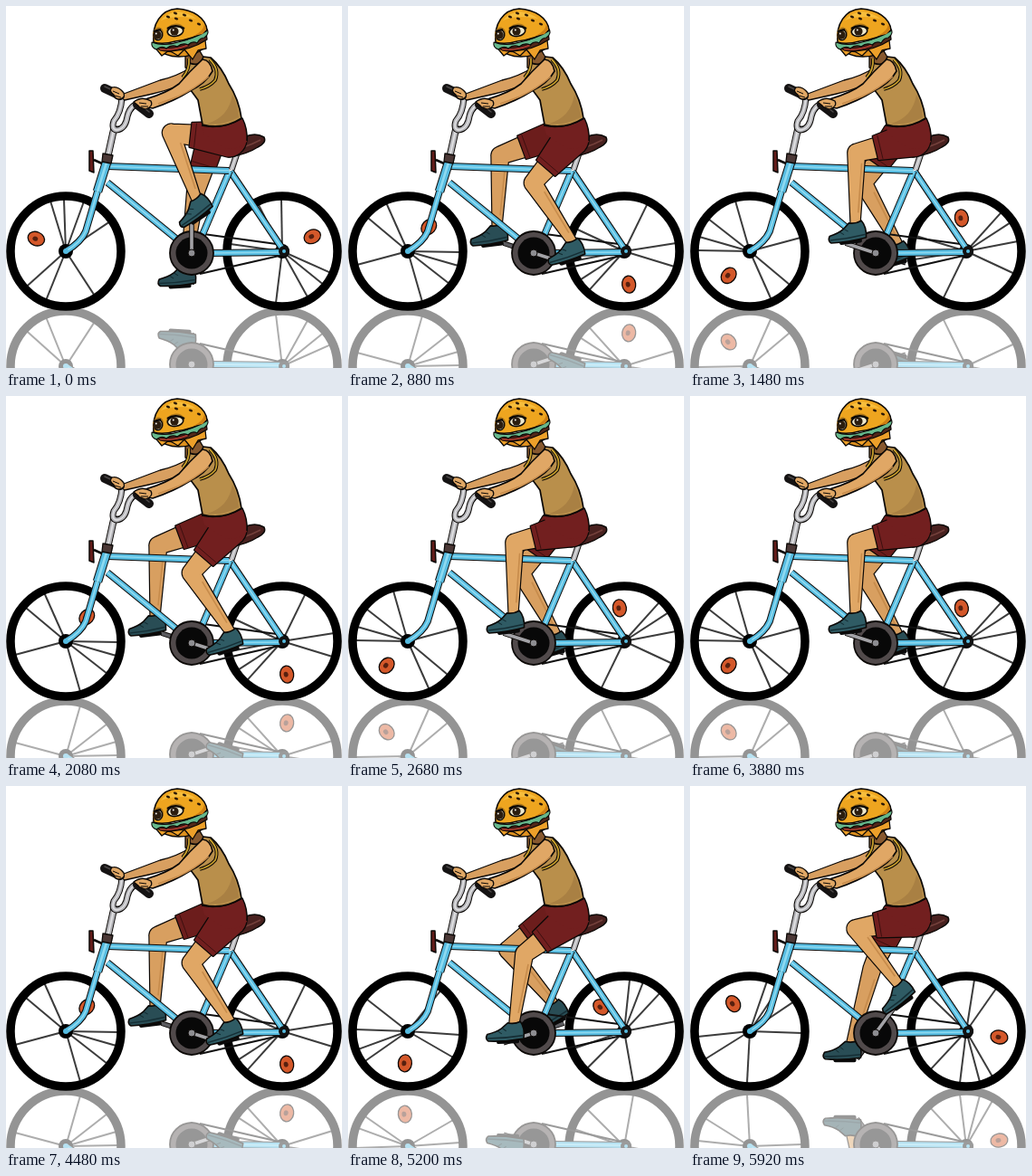
An HTML page with a canvas for the animation above (6000 ms loop, 371 by 400 pixels).

```html
<!DOCTYPE html>
<html lang="en">
<head>
<meta charset="utf-8">
<title>Burger rider</title>
<style>
html, body { margin: 0; width: 100%; height: 100%; overflow: hidden; background: #fff; }
canvas { display: block; width: 371px; height: 400px; }
</style>
</head>
<body>
<canvas id="stage" width="371" height="400"></canvas>
<script>
const W = 371, H = 400, FLOOR = 335, LOOP = 6000, POSES = 10;
const stage = document.getElementById('stage').getContext('2d');
const buffer = document.createElement('canvas');
buffer.width = W;
buffer.height = H;
const g = buffer.getContext('2d');

const INK = '#0b0806', SKIN = '#e0a765', FAR_SKIN = '#d89f60', SHADE = '#c68b4b';
const RED = '#721f1f', DARK_RED = '#6c1d1c', BLUE = '#55bbe0', GLOW = '#8fdaf0', STEEL = '#b4b4b8';
const HUB = 271, FRONT = 66, REAR = 305, AXLE = { x: 205, y: 273 };
const SPOKES = [107, 92, 70, 34, 222, 248, -57];
const TILT = [34, 20, 7, 2, 0, 3, 9, 16, 27, 36];

const rad = d => d * Math.PI / 180;
const polar = (x, y, r, deg) => ({ x: x + r * Math.cos(rad(deg)), y: y - r * Math.sin(rad(deg)) });
const mix = (a, b, k) => ({ x: a.x + (b.x - a.x) * k, y: a.y + (b.y - a.y) * k });

function shape(d, fill, line = 1.3, ink = INK) {
  const p = new Path2D(d);
  if (fill) { g.fillStyle = fill; g.fill(p); }
  if (line) { g.strokeStyle = ink; g.lineWidth = line; g.stroke(p); }
}

function oval(x, y, rx, ry, fill, line = 0, turn = 0) {
  g.beginPath();
  g.ellipse(x, y, rx, ry, rad(turn), 0, 7);
  g.fillStyle = fill;
  g.fill();
  if (line) { g.strokeStyle = INK; g.lineWidth = line; g.stroke(); }
}

function tube(d, width, color, shine) {
  shape(d, null, width + 2, INK);
  shape(d, null, width, color);
  if (shine) shape(d, null, width * 0.3, shine);
}

// Tapered limb with round ends
function taper(path, a, b, ra, rb) {
  const t = Math.atan2(b.y - a.y, b.x - a.x), q = Math.PI / 2, part = new Path2D();
  part.arc(a.x, a.y, ra, t + q, t + 3 * q);
  part.arc(b.x, b.y, rb, t - q, t + q);
  part.closePath();
  path.addPath(part);
}

function outlined(path, fill) {
  g.strokeStyle = INK;
  g.lineWidth = 2.4;
  g.stroke(path);
  g.fillStyle = fill;
  g.fill(path);
}

function wheel(cx, turn, reach) {
  g.strokeStyle = '#3c3c3c';
  g.lineWidth = 2;
  for (const s of SPOKES) {
    const end = polar(cx, HUB, 58, s + turn);
    g.beginPath();
    g.moveTo(cx, HUB);
    g.lineTo(end.x, end.y);
    g.stroke();
  }
  g.beginPath();
  g.arc(cx, HUB, 61, 0, 7);
  g.strokeStyle = '#000';
  g.lineWidth = 9.5;
  g.stroke();
  const side = 157 + turn, r = polar(cx, HUB, reach, side);
  oval(r.x, r.y, 9.5, 7.5, '#d4582a', 1.3, -side);
  oval(r.x - 1, r.y, 3, 2.5, '#57200f', 0, -side);
  oval(cx, HUB, 8, 8, '#000');
}

function knee(hip, ankle, thigh, shin) {
  const dx = ankle.x - hip.x, dy = ankle.y - hip.y, len = Math.hypot(dx, dy);
  const d = Math.min(len, thigh + shin - 0.5);
  const a = (thigh * thigh - shin * shin + d * d) / (2 * d);
  const h = Math.sqrt(Math.max(0, thigh * thigh - a * a));
  const ux = dx / len, uy = dy / len;
  return { x: hip.x + ux * a - uy * h, y: hip.y + uy * a + ux * h };
}

function shoe(foot, tilt, color) {
  g.save();
  g.translate(foot.x, foot.y);
  g.rotate(-rad(tilt));
  g.beginPath();
  g.roundRect(-10, 8, 25, 5, 2);
  g.fillStyle = '#0a0a0a';
  g.fill();
  shape('M3 -10 Q10 -8 17 -11 Q22 -4 20 8 Q0 11 -19 9.5 Q-23 7 -20 2 Q-10 0 -4 -4 Z', color, 1.6);
  shape('M-20 6.5 Q0 7 20 4.5', null, 1.6, '#152e35');
  shape('M-8 -1 L-4 2 M-3 -4 L1 -1', null, 1, '#122a30');
  g.restore();
}

function leg(hip, pose, shift, far) {
  const pedal = polar(AXLE.x, AXLE.y, 35, 90 + 36 * pose);
  const foot = { x: pedal.x + shift.x, y: pedal.y + shift.y };
  const t = rad(TILT[pose]);
  const ankle = {
    x: foot.x + 10 * Math.cos(t) - 9 * Math.sin(t),
    y: foot.y - 10 * Math.sin(t) - 9 * Math.cos(t)
  };
  const k = knee(hip, ankle, 64, 78);
  const skin = new Path2D();
  taper(skin, hip, k, 14, 9.5);
  taper(skin, k, ankle, 9.5, 5);
  outlined(skin, far ? FAR_SKIN : SKIN);
  const s = mix(k, ankle, 0.15), e = mix(k, ankle, 0.85);
  shape(`M${s.x + 6} ${s.y} L${e.x + 3} ${e.y}`, null, 1.6, SHADE);
  shoe(foot, TILT[pose], far ? '#294d55' : '#2f5b64');

  const hem = mix(hip, k, far ? 0.6 : 0.66), a = Math.atan2(k.y - hip.y, k.x - hip.x), q = Math.PI / 2;
  const sx = 13.5 * Math.sin(a), sy = 13.5 * Math.cos(a);
  const cloth = new Path2D();
  cloth.arc(hip.x, hip.y, far ? 16 : 19.5, a + q, a + 3 * q);
  cloth.lineTo(hem.x + sx, hem.y - sy);
  cloth.lineTo(hem.x - sx, hem.y + sy);
  cloth.closePath();
  outlined(cloth, far ? DARK_RED : RED);
  const m = mix(hem, hip, 0.12);
  shape(`M${m.x + sx} ${m.y - sy} L${m.x - sx} ${m.y + sy}`, null, 1, '#3d0f0f');
}

function crank(pose, far) {
  const end = polar(AXLE.x, AXLE.y, 35, 90 + 36 * pose);
  tube(`M${AXLE.x} ${AXLE.y} L${end.x} ${end.y}`, 3.6, far ? '#5c5c60' : '#a2a2a6');
}

function frame() {
  const tubes = ['M248 183 L307 271', 'M226 273 L307 272', 'M247 182 L213 262',
    'M112 177 L246 182', 'M112 195 L194 262'];
  for (const d of tubes) tube(d, 5.8, BLUE, GLOW);
  tube('M103 198 L88 249 Q83 261 66 271', 5.8, BLUE, GLOW);
  tube('M111 173 L101 205', 8.5, BLUE, GLOW);
  oval(REAR + 2, HUB, 6, 6, '#111');
  oval(REAR + 2, HUB, 2, 2, BLUE);
  oval(FRONT, HUB, 3, 3, BLUE);
}

function seat() {
  tube('M256 160 L249 181', 5, STEEL, '#ddd');
  shape('M237 158 Q252 156 263 145 Q275 139 285 145 Q288 151 278 156 Q266 164 246 167 Q236 165 237 158 Z', '#49211f', 1.5);
  shape('M243 160 Q262 158 281 148', null, 1.5, '#74403b');
}

function bars() {
  shape('M92 160 L96 160 L97 184 L92 182 Z', '#651d1a', 1.5);
  shape('M97 170 L106 174', null, 2.5);
  tube('M112 168 L120 132', 6, STEEL, '#e2e2e4');
  tube('M128 101 Q127 118 119 127 Q116 136 122 137 Q132 136 134 122 Q137 109 149 107', 5, STEEL, '#e2e2e4');
  shape('M107 163 L118 165 L116 174 L106 172 Z', '#4b3836', 1.3);
}

function grip(x1, y1, x2, y2) {
  g.lineCap = 'round';
  shape(`M${x1} ${y1} L${x2} ${y2}`, null, 10, '#151313');
  shape(`M${x1} ${y1 - 2} L${x2} ${y2 - 2}`, null, 1.5, '#4c4848');
  g.lineCap = 'butt';
}

function body() {
  // far arm
  shape('M204 68 Q188 78 170 82 L130 97 Q126 101 131 104 L162 97 Q188 91 208 80 Z', FAR_SKIN);
  grip(109, 91, 126, 99);
  shape('M117 90 Q124 88 130 96 Q132 102 125 103 Q120 103 119 98 Q113 94 117 90 Z', SKIN);
  shape('M118 94 L125 97 M120 99 L127 101', null, 1);

  shape('M198 50 L213 48 L220 60 L208 76 L198 68 Z', '#87592f');
  shape('M201 62 Q202 73 195 82 Q205 94 212 104 L217 131 Q240 137 260 124 Q257 103 246 86 Q238 67 226 57 L218 56 Q213 69 201 62 Z', '#b98f4b', 1.7);
  shape('M250 98 Q257 112 257 123 Q240 132 222 130 Q246 123 250 98 Z', '#a98043', 0);

  // near arm
  shape('M217 59 Q226 60 228 72 Q221 85 203 94 Q186 105 162 113 L152 111 Q148 107 154 103 Q178 96 191 86 Q203 72 217 59 Z', SKIN, 1.6);
  shape('M224 78 Q208 92 190 100 L168 108', null, 1.6, SHADE);
  for (const d of ['M225 59 Q236 70 231 82 Q225 89 214 92', 'M202 58 Q203 70 195 79']) {
    shape(d, null, 3.8);
    shape(d, null, 1.8, '#c9a02c');
  }
  grip(145, 109, 158, 119);
  shape('M141 106 Q150 99 160 105 Q163 111 154 114 Q147 112 146 110 Z', SKIN);
  shape('M147 107 L155 108 M149 111 L157 111', null, 1);
}

function eye(x, y, rx, ry, turn) {
  oval(x, y - 1, rx + 1.5, ry + 2, '#a9741a', 0, turn);
  oval(x, y, rx, ry, '#eee8cc', 1.5, turn);
  oval(x - 1, y, ry * 0.85, ry * 0.85, '#2b1d0e');
  oval(x - 2.2, y - 1.5, 0.9, 0.9, '#fff');
}

function head() {
  shape('M168 47 Q190 58 219 36 L220 45 Q209 56 191 56 Q175 56 168 47 Z', '#dd901f');
  shape('M163 44 L172 55 L180 49 L190 55 L197 48 L206 59 L212 49 L221 47 L220 38 Z', '#eda02a');
  shape('M163 42 Q188 46 221 29 L222 37 Q204 49 181 50 Q166 50 163 42 Z', '#52281a');
  shape('M168 46 Q184 49 203 41 L201 45 Q184 51 170 49 Z', '#a83a2f', 0.8);
  shape('M161 40 Q174 45 190 40 Q207 37 221 24 Q226 30 219 35 Q214 35 211 41 Q206 38 201 43 Q195 40 189 45 Q183 42 177 47 Q172 43 166 48 Q160 46 161 40 Z', '#66b88c', 1.1);
  shape('M163 40 C161 20 171 4 189 3 C206 4 221 13 222 27 Q207 37 187 39 Q173 43 163 40 Z', '#eea51f', 1.6);
  shape('M171 16 Q178 7 190 6 Q203 8 210 14 Q187 9 171 16 Z', '#f6bd3c', 0);
  shape('M207 33 Q218 28 219 20 Q223 26 217 31 Z', '#cf7f13', 0);
  eye(168, 32, 4.6, 5.6, 10);
  eye(187, 28, 8.7, 5.4, -8);
  shape('M163 28 L171 26 M178 25 Q187 19 197 25', null, 2.2);
  for (const [x, y] of [[179, 12], [187, 8], [197, 10], [204, 16], [213, 20], [188, 14]])
    oval(x, y, 2.3, 1.3, '#2c1907', 0, 20);
}

function paint(pose) {
  const turn = pose * 36, far = (pose + 5) % POSES;
  g.clearRect(0, 0, W, H);
  g.lineJoin = 'round';
  wheel(FRONT, turn, 35.5);
  wheel(REAR, turn - 131, 37);
  crank(far, true);
  leg({ x: 228, y: 143 }, far, { x: -16, y: -9 }, true);
  shape('M218 252 L306 264 M214 296 L306 275', null, 2.2, '#111');
  seat();
  frame();
  bars();
  oval(AXLE.x, AXLE.y, 24, 24, '#514a4b', 1.8);
  oval(AXLE.x, AXLE.y, 17.5, 17.5, '#080808');
  crank(pose, false);
  oval(AXLE.x, AXLE.y, 4, 4, '#8d8d91', 1);
  leg({ x: 246, y: 147 }, pose, { x: 2, y: -12 }, false);
  shape('M216 132 Q238 137 261 124 Q267 136 266 150 Q255 161 240 157 L219 142 Z', RED, 0);
  shape('M216 132 Q238 137 261 124 Q267 136 266 149', null, 1.5);
  body();
  head();

  stage.fillStyle = '#fff';
  stage.fillRect(0, 0, W, H);
  stage.save();
  stage.beginPath();
  stage.rect(0, FLOOR, W, H - FLOOR);
  stage.clip();
  stage.globalAlpha = 0.42;
  stage.translate(0, FLOOR * 2 - 1);
  stage.scale(1, -1);
  stage.drawImage(buffer, 0, 0);
  stage.restore();
  stage.drawImage(buffer, 0, 0);
}

let shown = -1;
function tick() {
  const t = performance.now() % LOOP;
  const pose = t < 160 ? 0 : (1 + Math.floor((t - 160) / 120)) % POSES;
  if (pose !== shown) paint(shown = pose);
  requestAnimationFrame(tick);
}
tick();
</script>
</body>
</html>
```
